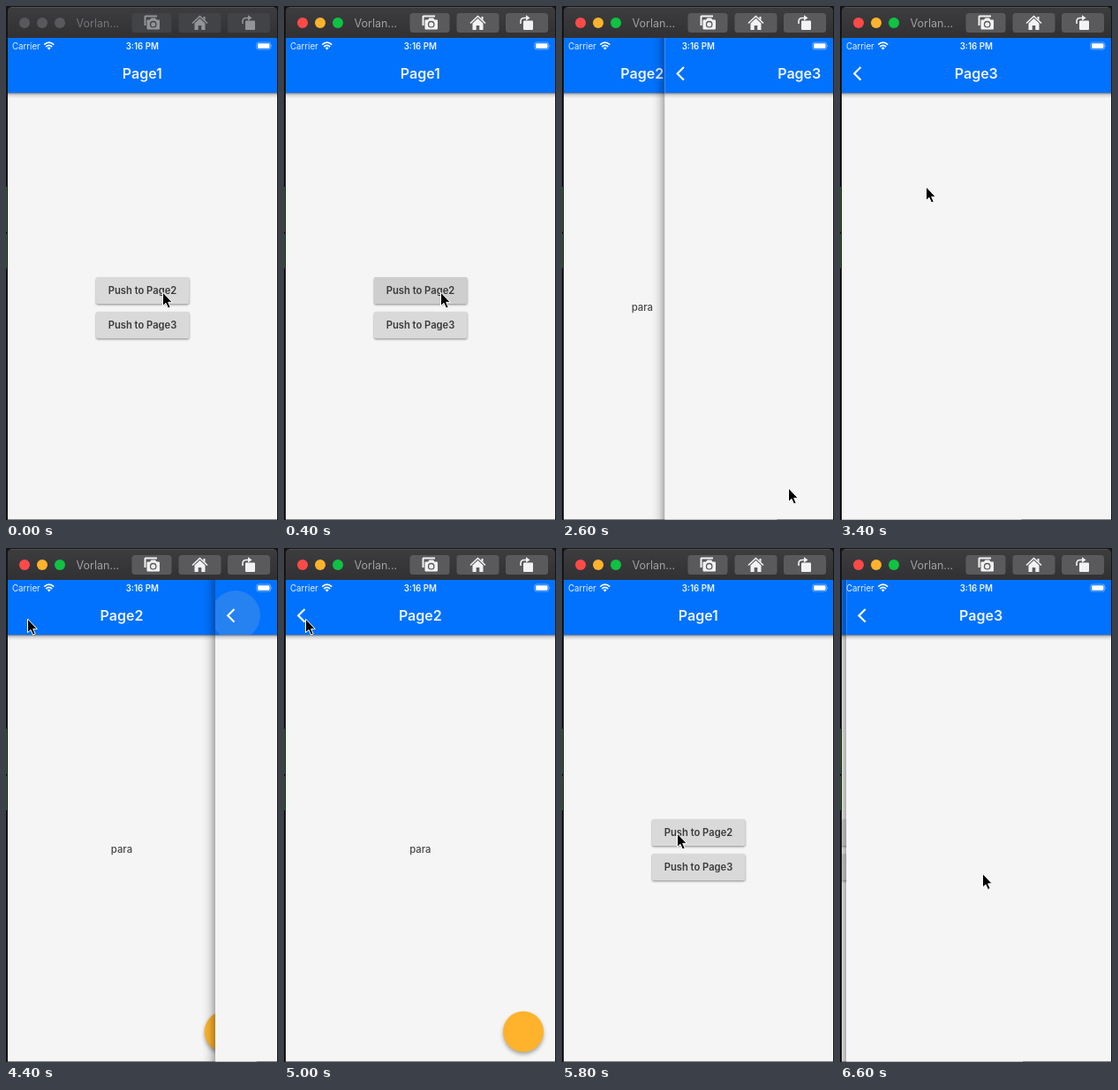
Animation of 308x580 px, one loop 6800 ms. Source, as an HTML page:

```html
<!DOCTYPE html>
<html lang="en">
<head>
<meta charset="utf-8">
<title>Page navigation</title>
<style>
html, body { margin: 0; width: 100%; height: 100%; overflow: hidden; background: #111; }
svg { display: block; width: 100%; height: 100%; }
text { font-family: Inter, Roboto, sans-serif; }
.mid { text-anchor: middle; }
.title { font-size: 16px; font-weight: 600; fill: #edf4ff; }
.label { font-size: 11.2px; font-weight: 600; fill: #3a3a3b; }
.body { font-size: 11.3px; font-weight: 500; fill: #474747; }
.press { fill: #bcbcbc; }
.tool rect { fill: #5a5a5d; }
.tool .icon { color: #f2f2f2; }
.lens { stroke: #5a5a5d; }
.idle .tool rect { fill: #424346; }
.idle .tool .icon { color: #939497; }
.idle .lens { stroke: #424346; }
.idle .lights circle { fill: #58595c; }
.idle .name { fill: #737478; }
</style>
</head>
<body>
<svg viewBox="0 0 308 580">
  <defs>
    <clipPath id="screen"><rect x="2" y="36" width="305" height="543.5"/></clipPath>
    <clipPath id="barClip"><rect x="2" y="36" width="305" height="62"/></clipPath>
    <linearGradient id="chrome" x2="0" y2="1">
      <stop offset="0" stop-color="#3d3d40"/><stop offset="1" stop-color="#313134"/>
    </linearGradient>
    <linearGradient id="edge">
      <stop offset="0" stop-opacity="0"/><stop offset=".3" stop-opacity=".03"/>
      <stop offset=".6" stop-opacity=".1"/><stop offset="1" stop-opacity=".3"/>
    </linearGradient>
    <linearGradient id="drop" x2="0" y2="1">
      <stop offset="0" stop-opacity=".5"/><stop offset=".35" stop-opacity=".15"/><stop offset="1" stop-opacity="0"/>
    </linearGradient>
    <filter id="blur" x="-30%" y="-30%" width="160%" height="160%"><feGaussianBlur stdDeviation="1.2"/></filter>
    <filter id="blurBig" x="-30%" y="-30%" width="160%" height="160%"><feGaussianBlur stdDeviation="2.6"/></filter>
  </defs>
  <rect width="308" height="580" fill="#141414"/>
  <path d="M.5 204V255M.5 257V296" stroke="#236e20"/>
  <g id="chromeBar">
    <path d="M2 36V6Q2 1 7 1H302Q307 1 307 6V36Z" fill="url(#chrome)"/>
    <path d="M6 1.5H303" stroke="#57575a" stroke-width=".8"/>
    <g class="lights">
      <circle cx="21" cy="19" r="6" fill="#fc4a48"/>
      <circle cx="41" cy="19" r="6" fill="#fdb32c"/>
      <circle cx="61" cy="19" r="6" fill="#10c243"/>
    </g>
    <text class="name" x="79.5" y="23.7" font-size="12.5" fill="#a0a0a3">Vorlan...</text>
    <g class="tool">
      <rect x="142.5" y="8" width="45" height="22" rx="3.5"/>
      <rect x="195.5" y="8" width="48" height="22" rx="3.5"/>
      <rect x="251" y="8" width="48" height="22" rx="3.5"/>
      <g class="icon" fill="currentColor">
        <path d="M156.5 22V12Q156.5 10.5 158 10.5H171V12.5H158.5V22Z"/>
        <path d="M160.5 15.5H163L164.5 13.5H169L170.5 15.5H173Q174 15.5 174 16.5V25.5Q174 26.5 173 26.5H160.5Q159.5 26.5 159.5 25.5V16.5Q159.5 15.5 160.5 15.5Z"/>
        <circle class="lens" cx="166.7" cy="20.7" r="3.2" fill="none" stroke-width="1.3"/>
        <path d="M211 19.5L219.5 11.5L228 19.5" fill="none" stroke="currentColor" stroke-width="1.6"/>
        <path d="M213.5 19.5L219.5 14L225.5 19.5V27H221.3V22H217.7V27H213.5ZM223.5 12H225.5V16L223.5 14.5Z"/>
        <path d="M272 16.5H281Q282 16.5 282 17.5V26Q282 27 281 27H272Q271 27 271 26V17.5Q271 16.5 272 16.5Z"/>
        <path d="M268 20V17.5Q268 13.5 272 13.5H275" fill="none" stroke="currentColor" stroke-width="1.6"/>
        <path d="M274 10.3L278.5 13.5L274 16.5Z"/>
      </g>
    </g>
  </g>
  <g clip-path="url(#screen)" id="pages"></g>
  <g fill="#fff">
    <text x="7" y="48.7" font-size="9.7" fill="#e4eeff">Carrier</text>
    <text class="mid" x="154.3" y="48.7" font-size="9.7" font-weight="600" fill="#f0f6ff">3:16 PM</text>
    <path d="M43.2 43.7Q48.7 38.7 54.2 43.7M45.2 46Q48.7 42.8 52.2 46" fill="none" stroke="#fff" stroke-width="1.7"/>
    <path d="M46.7 47.3Q48.7 45.6 50.7 47.3L48.7 49.5Z"/>
    <rect x="283.7" y="41" width="16" height="8" rx="2.2" fill="none" stroke="#fff" stroke-opacity=".5" stroke-width=".8"/>
    <rect x="285" y="42.2" width="13.5" height="5.6" rx="1.2"/>
    <path d="M300.7 43.7Q302 45 300.7 46.3Z" opacity=".7"/>
  </g>
  <path id="cursor" d="M0 0V15.5L3.5 12.3L6 18L8.7 16.8L6.2 11.3H10.8Z" stroke="#fff" stroke-width="1" stroke-linejoin="round"/>
</svg>
<script>
const LOOP = 6800, STEP = 200, WIDTH = 305;
const $ = id => document.getElementById(id);

const button = (id, y, label) => `
  <rect x="102" y="${y + 1.2}" width="105.5" height="30" rx="2" opacity=".4" filter="url(#blur)"/>
  <rect x="102" y="${y}" width="105.5" height="30" rx="1.7" fill="#d9d9da"/>
  <rect class="press" id="${id}" x="102" y="${y}" width="105.5" height="30" rx="1.7"/>
  <text class="mid label" x="154.5" y="${y + 18.6}">${label}</text>`;

const back = n => `
  <circle class="press" id="glow${n}" cx="25" cy="76" r="28" clip-path="url(#barClip)"/>
  <path d="M23.5 69L16.2 76.2L23.5 83.4" fill="none" stroke="#fff" stroke-width="2.1"/>`;

const page = (n, content) => `<g id="page${n}">
  ${n > 1 ? '<rect x="-13.2" y="36" width="15.2" height="544" fill="url(#edge)"/>' : ''}
  <rect x="2" y="36" width="${WIDTH}" height="544" fill="#f5f5f5"/>
  ${content}
  <rect x="2" y="98" width="${WIDTH}" height="6" fill="url(#drop)"/>
  <rect x="2" y="36" width="${WIDTH}" height="62" fill="#0072fe"/>
  ${n > 1 ? back(n) : ''}
  <text class="mid title" x="154.3" y="82">Page${n}</text></g>`;

$('pages').innerHTML =
  page(1, button('press2', 306, 'Push to Page2') + button('press3', 345, 'Push to Page3')) +
  page(2, `<text class="mid body" x="154.3" y="344">para</text>
    <circle cx="271" cy="548.5" r="22.5" opacity=".38" filter="url(#blurBig)"/>
    <circle cx="271" cy="545.7" r="23" fill="#ffb32c"/>
    <circle class="press" id="pressFab" cx="271" cy="545.7" r="23"/>`) +
  page(3, '');

// start time, lower page, upper page, is pop
const moves = [
  [-LOOP, 1, 2, true],
  [500, 1, 2, false],
  [2500, 2, 3, false],
  [4267, 2, 3, true],
  [5289, 1, 2, true],
  [6300, 1, 3, false]
];

// time, x, y of the pointer tip
const path = [
  [0, 177.5, 323], [800, 177.5, 323], [1400, 256.5, 544], [2800, 256.5, 544],
  [3400, 97.5, 204], [3800, 24.5, 80], [5400, 24.5, 80],
  [5800, 130.5, 322], [6000, 161.5, 367.5], [LOOP, 161.5, 367.5]
];

// cubic-bezier(.67, .03, .65, .09)
function ease(x) {
  const bez = (s, a, b) => 3 * (1 - s) ** 2 * s * a + 3 * (1 - s) * s * s * b + s ** 3;
  let lo = 0, hi = 1;
  for (let i = 0; i < 24; i++) {
    const mid = (lo + hi) / 2;
    if (bez(mid, .67, .65) < x) lo = mid; else hi = mid;
  }
  return bez(lo, .03, .09);
}

function pointer(t) {
  const i = path.findIndex(p => p[0] > t);
  const [t0, x0, y0] = path[i - 1], [t1, x1, y1] = path[i];
  const k = (t - t0) / (t1 - t0);
  return [x0 + (x1 - x0) * k, y0 + (y1 - y0) * k];
}

const shift = (el, x, y = 0) => el.setAttribute('transform', `translate(${x.toFixed(2)} ${y.toFixed(2)})`);

function draw(t) {
  const [start, under, top, pop] = moves.filter(m => m[0] <= t).pop();
  const rest = ease(1 - Math.min(1, (t - start) / 400));
  const off = pop ? 1 - rest : rest;
  for (let n = 1; n <= 3; n++) {
    const shown = n === under || (n === top && off < .9999);
    $('page' + n).style.display = shown ? '' : 'none';
  }
  shift($('page' + top), off * WIDTH);
  shift($('page' + under), (off - 1) * WIDTH / 3);

  const press = (id, from, to, alpha) => $(id).setAttribute('opacity', t >= from && t < to ? alpha : 0);
  press('press2', 400, 800, .4);
  press('press3', 6200, 6600, .4);
  press('pressFab', 2400, 2800, .4);
  press('glow2', 5289, 5800, .2);
  press('glow3', 4200, 4800, .2);

  $('chromeBar').classList.toggle('idle', t < 200);
  shift($('cursor'), ...pointer(t));
}

const origin = performance.now();
function tick() {
  const t = (performance.now() - origin) % LOOP;
  draw(Math.floor(t / STEP) * STEP);
  requestAnimationFrame(tick);
}
tick();
</script>
</body>
</html>
```
